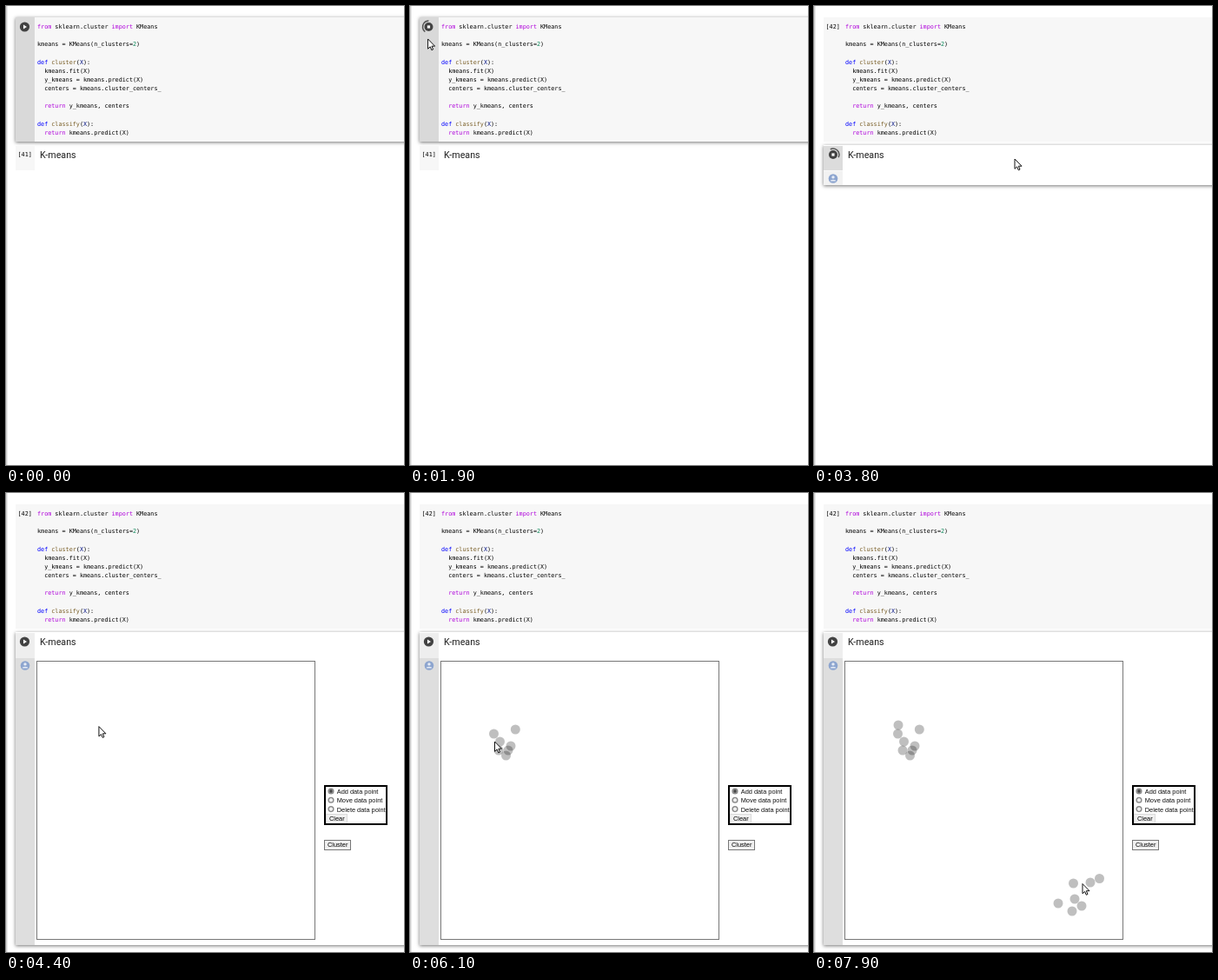
An HTML page with a canvas for the animation above (8 s loop, 458x528 px).

```html
<!DOCTYPE html>
<html lang="en">
<head>
<meta charset="utf-8">
<title>K-means notebook</title>
<style>
html, body { margin: 0; width: 100%; height: 100%; overflow: hidden; background: #fff; }
canvas { display: block; }
</style>
</head>
<body>
<canvas id="stage" width="458" height="528"></canvas>
<script>
const c = document.getElementById('stage').getContext('2d');
const LOOP = 8000, STEP = 100, TAU = Math.PI * 2;
const MONO = '6.78px "DejaVu Sans Mono", monospace';
const SANS = '7.4px "Liberation Sans", Arial, sans-serif';
const DARK = '#424242';

// Moments of the session, in ms
const RUN_1 = 1000, SPIN_1 = 1800, LEAVE_1 = 2100, FOCUS_2 = 2400, RUN_2 = 2700,
      DONE_1 = 3200, OUTPUT = 3700, WIDGET = 4100;

// Code colours: k keyword, d def, f function name, v parameter, n number, p plain
const INK = { k: '#af00db', d: '#0000ff', f: '#795e26', v: '#001080', n: '#098658', p: '#000' };
const CODE = [
  'k:from |p:sklearn.cluster |k:import |p:KMeans', '',
  'p:kmeans = KMeans(n_clusters=|n:2|p:)', '',
  'd:def |f:cluster|p:(|v:X|p:):',
  'p:  kmeans.fit(X)',
  'p:  y_kmeans = kmeans.predict(X)',
  'p:  centers = kmeans.cluster_centers_', '',
  'k:  return |p:y_kmeans, centers', '',
  'd:def |f:classify|p:(|v:X|p:):',
  'k:  return |p:kmeans.predict(X)'
].map(line => line.split('|').filter(Boolean).map(s => [INK[s[0]], s.slice(2)]));

// Data points: time, x, y
const POINTS = [
  [4800, 96.5, 277], [5000, 103.5, 286], [5300, 121.3, 272], [5500, 116, 291],
  [5600, 113, 296], [5700, 110.5, 302], [5900, 102, 296], [6200, 97, 267],
  [6700, 328.5, 443.5], [6900, 281, 472], [7100, 297, 481], [7300, 308, 475],
  [7400, 300, 467], [7500, 298.5, 449], [7700, 318, 448]
];

// Cursor path: time, x, y
const PATH = [
  [100, 168, 416], [800, 20, 23], [1800, 20, 23], [2300, 26, 167], [2800, 26, 167],
  [3400, 231, 186], [3600, 231, 176], [3900, 231, 176], [4500, 97, 276], [4800, 96, 277],
  [4900, 103, 290], ...POINTS.slice(1, 7), [6100, 97.5, 286],
  ...POINTS.slice(7, 8), [6300, 97, 267], ...POINTS.slice(8), [7900, 309, 449.5]
];

const ARROW = new Path2D('M0 0V11.3L2.6 8.9 4.3 12.8 6 12 4.4 8.2H8Z');
const HAND = new Path2D('M-1.2 1Q0-.8 1.2 1V5Q2.5 4 3.5 5.4Q5 4.8 5.8 6Q7.4 5.8 7.4 7.5V10Q7 12 6 13V15H-1V13.5L-4 9.5Q-5 7.4-3 7.6L-1.2 9.2Z');

function rect(x, y, w, h, fill) {
  c.fillStyle = fill;
  c.fillRect(x, y, w, h);
}

function frame(x, y, w, h, color, width = 1) {
  c.strokeStyle = color;
  c.lineWidth = width;
  c.strokeRect(x, y, w, h);
}

function disc(x, y, r, fill) {
  c.fillStyle = fill;
  c.beginPath();
  c.arc(x, y, r, 0, TAU);
  c.fill();
}

function text(s, x, y, font, fill = '#000') {
  c.font = font;
  c.fillStyle = fill;
  c.fillText(s, x, y);
}

function raised(x, y, w, h, fill) {
  c.save();
  c.shadowColor = 'rgba(0,0,0,.55)';
  c.shadowBlur = 4;
  c.shadowOffsetY = 1;
  rect(x, y, w, h, fill);
  c.restore();
}

function playIcon(x, y) {
  disc(x, y, 5.6, DARK);
  c.fillStyle = '#fff';
  c.beginPath();
  c.moveTo(x - 1.5, y - 2.5);
  c.lineTo(x + 2.5, y);
  c.lineTo(x - 1.5, y + 2.5);
  c.fill();
}

function ring(x, y, r, from, to, dash, color) {
  c.strokeStyle = color;
  c.lineWidth = 1.5;
  c.setLineDash(dash);
  c.beginPath();
  c.arc(x, y, r, from, to);
  c.stroke();
  c.setLineDash([]);
}

function stopIcon(x, y, color) {
  disc(x, y, 5, color);
  rect(x - 1.6, y - 1.6, 3.2, 3.2, '#fff');
}

function pending(x, y, t) {
  stopIcon(x, y, DARK);
  const a = t / 1000;
  ring(x, y, 6.8, a, a + TAU, [2.2, 1.4], DARK);
}

function running(x, y, mid, color) {
  stopIcon(x, y, color);
  ring(x, y, 7, mid - 1.25, mid + 1.25, [], '#555');
}

function codeCell(t) {
  const active = t < FOCUS_2;
  if (active) raised(11, 13, 460, 143, '#f7f7f7');
  else rect(11, 13, 447, 143, '#f7f7f7');
  if (t < LEAVE_1) rect(11, 13, 22, 143, '#d9d9d9');

  CODE.forEach((line, i) => {
    let x = 36;
    for (const [color, s] of line) {
      text(s, x, 25.9 + i * 10.16, MONO, color);
      x += c.measureText(s).width;
    }
  });

  if (t < RUN_1) playIcon(21.5, 24);
  else if (t < SPIN_1) pending(21.5, 24, t);
  else if (t < DONE_1) running(21.5, 24, Math.PI / 2 + (t - 2600) / 1000 * TAU, active ? DARK : '#a8a8a8');
  else text('[42]', 13.5, 26, MONO);
}

function personIcon(x, y) {
  disc(x, y, 5.3, '#8da5cf');
  disc(x, y - 1.6, 1.7, '#e6ecf6');
  c.fillStyle = '#e6ecf6';
  c.beginPath();
  c.ellipse(x, y + 3, 3.2, 1.7, 0, Math.PI, TAU);
  c.fill();
}

function formCell(t) {
  const bottom = t < OUTPUT ? 189 : t < WIDGET ? 206 : 520;
  if (t >= FOCUS_2) raised(11, 160, 460, bottom - 160, '#fff');

  const hover = t >= LEAVE_1 && t < WIDGET;
  rect(11, 161, 22, 28, hover ? '#dcdcdc' : t < LEAVE_1 ? '#f7f7f7' : '#eeeeee');
  if (t >= OUTPUT) {
    rect(11, 189.5, 22, bottom - 189.5, t < WIDGET ? '#f2f2f2' : '#dedede');
    personIcon(22, 198.5);
  }
  text('K-means', 39, 175, '10.7px Roboto, sans-serif', '#212121');

  if (t < LEAVE_1) text('[41]', 13.5, 173, MONO);
  else if (t < RUN_2 || t >= WIDGET) playIcon(21.5, 171);
  else if (t < DONE_1) pending(21.5, 171, t);
  else running(22, 171, -Math.PI / 4 + (t - 3800) / 1000 * TAU, DARK);
}

function button(label, x, y, w, h, edge) {
  rect(x, y, w, h, '#f0f0f0');
  frame(x + .5, y + .5, w - 1, h - 1, edge);
  text(label, x + 4, y + 8.3, SANS);
}

function widget(t) {
  frame(35.5, 193.5, 320, 320, '#777');
  ['Add data point', 'Move data point', 'Delete data point'].forEach((label, i) => {
    const y = 343 + i * 10.3;
    disc(374, y, 3, '#fff');
    ring(374, y, 2.8, 0, TAU, [], '#8a8a8a');
    disc(374, y, 1.9, i ? '#eee' : '#444');
    text(label, 380.7, y + 3, SANS, '#111');
  });
  button('Clear', 368, 369, 25, 12, '#dadada');
  frame(367, 337, 71, 44, '#000', 2);
  button('Cluster', 366, 399, 31, 12, '#777');

  for (const [at, x, y] of POINTS) if (t >= at) disc(x, y, 5.5, 'rgba(0,0,0,.25)');
}

function cursor(t) {
  if (t < PATH[0][0]) return;
  let i = 0;
  while (i < PATH.length - 2 && t >= PATH[i + 1][0]) i++;
  const [t0, x0, y0] = PATH[i], [t1, x1, y1] = PATH[i + 1];
  const u = Math.min(1, (t - t0) / (t1 - t0)), e = u * u * (3 - 2 * u);
  const x = x0 + (x1 - x0) * e, y = y0 + (y1 - y0) * e;
  const overButton = Math.abs(x - 22) < 7 && (Math.abs(y - 24) < 7 || Math.abs(y - 171) < 7);
  const shape = overButton ? HAND : ARROW;

  c.save();
  c.translate(x, y);
  c.lineJoin = 'round';
  c.lineWidth = 1;
  c.fillStyle = '#fff';
  c.strokeStyle = '#111';
  c.fill(shape);
  c.stroke(shape);
  if (overButton) {
    c.beginPath();
    for (const fx of [1.2, 3.5, 5.7]) {
      c.moveTo(fx, 5.4);
      c.lineTo(fx, 8);
    }
    c.lineWidth = .7;
    c.stroke();
  }
  c.restore();
}

function draw(now) {
  const t = Math.floor(now % LOOP / STEP) * STEP;
  rect(0, 0, 458, 528, '#fff');
  rect(0, 0, 1.5, 528, '#d0d0d0');
  codeCell(t);
  formCell(t);
  if (t >= WIDGET) widget(t);
  cursor(t);
}

let start;
function tick(now) {
  start ??= now;
  draw(now - start);
  requestAnimationFrame(tick);
}
draw(0);
requestAnimationFrame(tick);
</script>
</body>
</html>
```
